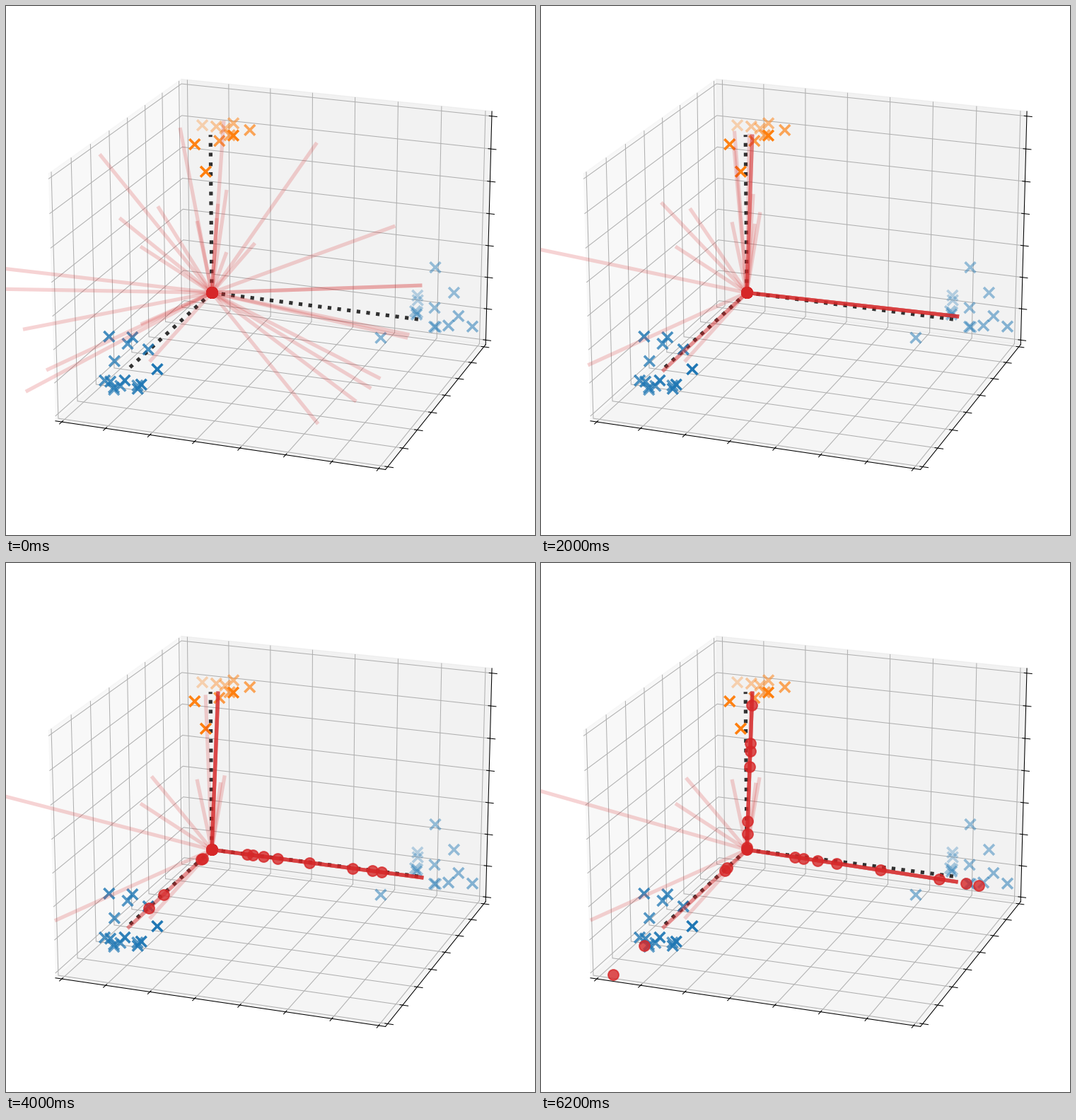
These frames come from a looping animation (748 by 748 pixels, 6400 ms). A matplotlib script:

```python
import numpy as np
import matplotlib.pyplot as plt
from matplotlib.animation import FuncAnimation
from matplotlib.collections import LineCollection
from matplotlib.colors import to_rgba

SIZE, DPI = 748, 93.5
FRAMES, STEP = 32, 200
ORIGIN = np.array([291.0, 405.4])
RED, BLUE, ORANGE = "tab:red", "tab:blue", "tab:orange"
AXIS_LENGTH = {"x": 302, "y": 163, "z": 224}

# Rays that join an axis: (axis, start angle, start length, turning time)
JOINING = [
    *[("x", a, 300 - 1.2 * abs(a), 450)
      for a in (-20, -2, -2, 12, 13, 27, 31, 37, 51)],
    *[("z", a, r, 420) for a, r in ((-49, 93), (-55, 259), (-70, 61), (-86, 244))],
    ("y", 169, 272, 660), ("y", 152, 298, 660), ("y", 156, 110, 450),
    ("z", -129, 252, 1100), ("z", -179, 301, 1300), ("z", -122, 144, 1600),
    ("z", -141, 168, 2700), ("z", -86, 126, 2700),
]

# Rays that settle on their own: start tip, end tip, decay time
LOOSE = [
    ((190, 340), (190, 340), 1600), ((203, 503), (203, 503), 1600),
    ((270, 304), (270, 306), 1600), ((57, 515), (70, 505), 1600),
    ((312, 260), (309, 304), 1600), ((298, 300), (304, 311), 1600),
    ((246, 172), (205, 304), 1000), ((-40, 367), (2, 317), 2700),
]

# Circles per axis: midpoint of growth and final reach in axis lengths
CIRCLES = {
    "x": (3280, [.23, .27, .34, .43, .64, .92, 1.05, 1.11]),
    "y": (3840, [.24, .27, 1.25, 1.63]),
    "z": (5120, [.02, .12, .22, .63, .75, .81, 1.1]),
}


def polar(length, degrees):
    a = np.radians(degrees)
    return length * np.array([np.cos(a), np.sin(a)])


def axis_angle(axis, t):
    if axis == "x":
        return 6.4 + 2.3 / (1 + np.exp((4000 - t) / 300))
    if axis == "z":
        return -88 + 1.1 * np.exp(-((t - 4800) / 700) ** 2)
    return 137


def joining_tip(t, axis, angle, length, turn):
    """Hold the start direction, then swing onto the axis."""
    left = 1 / (1 + (t / turn) ** 6)
    goal_angle, goal_length = axis_angle(axis, t), AXIS_LENGTH[axis]
    return ORIGIN + polar(goal_length + (length - goal_length) * left,
                          goal_angle + (angle - goal_angle) * left)


def loose_tip(t, start, end, decay):
    start, end = np.array(start), np.array(end)
    return end + (start - end) * np.exp(-t / decay)


def growth(t, middle):
    """Slow start, fast rise, long tail."""
    return np.exp(-np.exp(-(t - middle) / 645))


def draw_box(ax):
    ax.view_init(elev=20, azim=-70)
    pad = 1.4 / 48
    ticks = np.linspace(-0.2, 1.2, 8)
    ax.set_xlim(-0.2 - pad, 1.2 + pad)
    ax.set_ylim(-1.2 - pad, 0.2 + pad)
    ax.set_zlim(-0.2 - pad, 1.2 + pad)
    for axis, values in ((ax.xaxis, ticks), (ax.yaxis, -ticks[::-1]),
                         (ax.zaxis, ticks)):
        axis.set_ticks(values)
        axis.set_ticklabels([])


def cluster(rng, center, count):
    noise = rng.normal(0, 0.1, (count, 3))
    return np.array(center) + noise - noise.mean(axis=0)


def crosses(ax, points, color):
    ax.scatter(*points.T, s=130, marker="x", color=color, linewidths=2.8)


fig = plt.figure(figsize=(SIZE / DPI, SIZE / DPI), dpi=DPI, facecolor="white")
box = fig.add_axes([0, 0, 1, 1], projection="3d")
for end in ((1, 0, 0), (0, -1, 0), (0, 0, 1)):
    box.plot(*([0, v] for v in end), ":", color="black", alpha=0.8, lw=4)
rng = np.random.default_rng(4)
near = cluster(rng, (0, -1, 0), 15)
far = cluster(rng, (1.04, 0, 0.06), 14)
crosses(box, np.vstack([near, far]), BLUE)
crosses(box, cluster(rng, (0.05, 0, 1), 10), ORANGE)
draw_box(box)

# Flat layer in pixel coordinates on top of the box
flat = fig.add_axes([0, 0, 1, 1])
flat.axis("off")
rays = LineCollection([], colors=[to_rgba(RED, 0.2)], linewidths=4,
                      capstyle="butt", zorder=2)
flat.add_collection(rays, autolim=False)
circle_style = dict(s=130, color=RED, linewidths=1.5)
circles = flat.scatter([], [], alpha=0.8, zorder=3, **circle_style)
flat.scatter(*ORIGIN, zorder=4, **circle_style)
flat.set(xlim=(0, SIZE), ylim=(SIZE, 0))


def update(i):
    t = i * STEP
    tips = [joining_tip(t, *ray) for ray in JOINING]
    tips += [loose_tip(t, *ray) for ray in LOOSE]
    rays.set_segments([[ORIGIN, tip] for tip in tips])

    places = []
    for axis, (middle, reach) in CIRCLES.items():
        arm = polar(AXIS_LENGTH[axis], axis_angle(axis, t))
        places.append(ORIGIN + np.outer(reach, arm) * growth(t, middle))
    circles.set_offsets(np.vstack(places))
    return rays, circles


anim = FuncAnimation(fig, update, frames=FRAMES, interval=STEP, repeat=True,
                     repeat_delay=0, blit=False)
plt.show()
```
